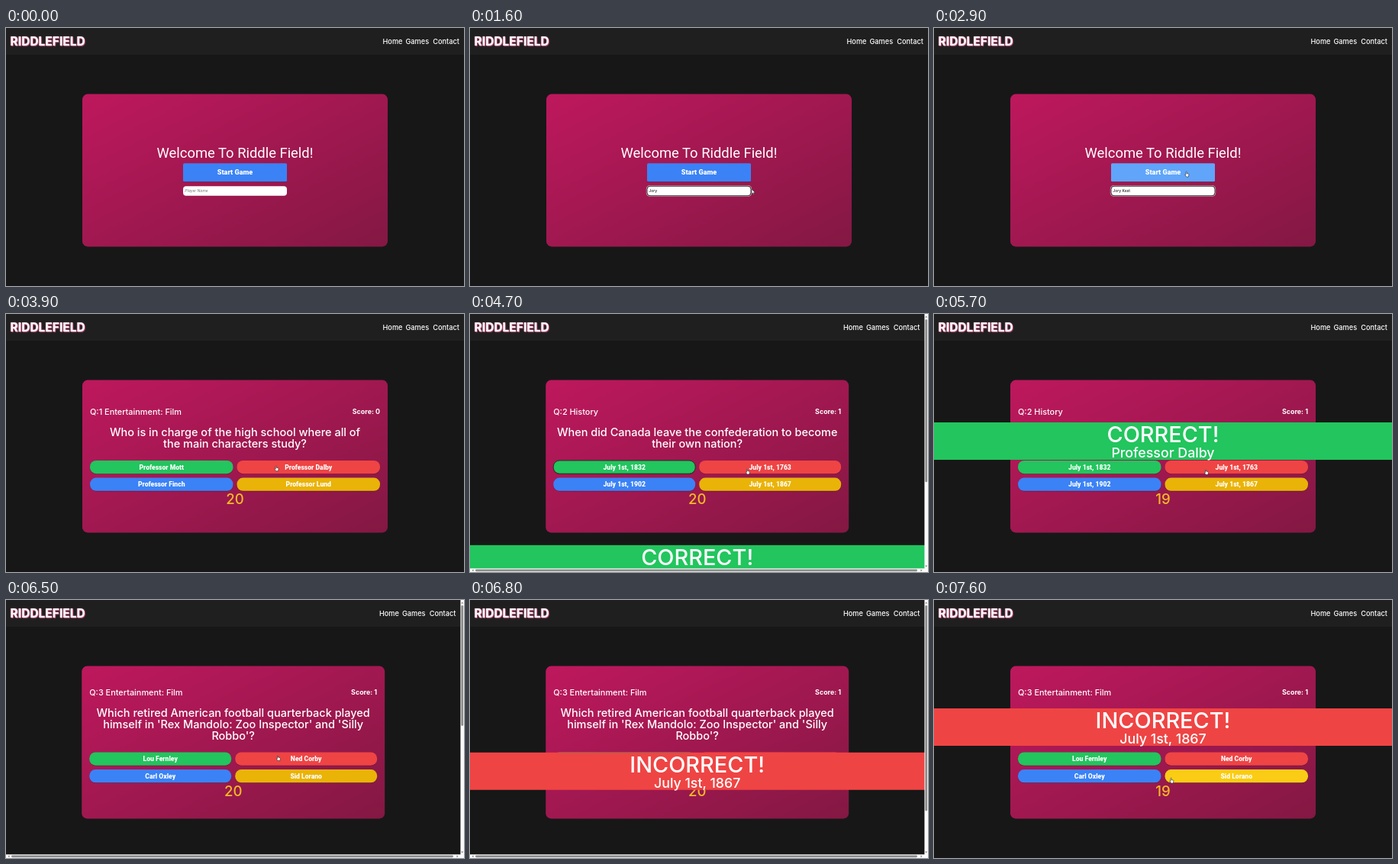
Recreate the animation shown at these times as an HTML page. Size 600 px wide and 338 px high, loop 8000 ms.

```html
<!DOCTYPE html>
<html lang="en">
<head>
<meta charset="utf-8">
<title>Quiz game</title>
<style>
  html, body { margin: 0; width: 100%; height: 100%; overflow: hidden; background: #171717; }
  svg { display: block; width: 100%; height: 100%; }
  text { font-family: Inter, sans-serif; font-weight: 500; fill: #fff; white-space: pre; }
  .heavy { font-family: Roboto, sans-serif; font-weight: 900; }
  .plain { font-family: Roboto, sans-serif; font-weight: 400; }
  .bold { font-weight: 700; }
  .logo { font-weight: 800; fill: #fff4f8; text-shadow: 0 0 1.5px #e0759f, .7px .7px 1px #b8456f; }
  .hint { font-weight: 400; font-style: italic; fill: #777; }
  .typed { fill: #222; }
  .timer { fill: #f4b925; }
</style>
</head>
<body>
<svg viewBox="0 0 600 338">
  <defs>
    <linearGradient id="pink" gradientUnits="userSpaceOnUse" x1="220" y1="27" x2="380" y2="347">
      <stop stop-color="#be185d"/><stop offset="1" stop-color="#831843"/>
    </linearGradient>
  </defs>
  <g id="stage"></g>
</svg>
<script>
const LOOP = 8000, STEP = 100, VIEW_H = 334;
const GREEN = '#22c55e', RED = '#ef4444', BLUE = '#3b82f6', YELLOW = '#eab308';
const PLAYER = 'Jory Kest';
const KEY_TIMES = [1200, 1400, 1400, 1600, 1700, 1800, 2000, 2100, 2200];

const ROUNDS = [
  { start: 3400, tick: 4200, score: 0, topic: 'Q:1 Entertainment: Film',
    lines: ['Who is in charge of the high school where all of', 'the main characters study?'],
    answers: ['Professor Mott', 'Professor Dalby', 'Professor Finch', 'Professor Lund'] },
  { start: 4500, tick: 5550, score: 1, topic: 'Q:2 History',
    lines: ['When did Canada leave the confederation to become', 'their own nation?'],
    answers: ['July 1st, 1832', 'July 1st, 1763', 'July 1st, 1902', 'July 1st, 1867'] },
  { start: 6500, tick: 7450, score: 1, topic: 'Q:3 Entertainment: Film',
    lines: ['Which retired American football quarterback played',
            "himself in 'Rex Mandolo: Zoo Inspector' and 'Silly", "Robbo'?"],
    answers: ['Lou Fernley', 'Ned Corby', 'Carl Oxley', 'Sid Lorano'] }
];

const BANNERS = [
  { start: 4564, leave: 6100, color: GREEN, title: 'CORRECT!', note: 'Professor Dalby' },
  { start: 6504, leave: LOOP, color: RED, title: 'INCORRECT!', note: 'July 1st, 1867' }
];

// time, x, y of the pointer tip
const POINTER = [
  [800, 369, 211], [2600, 369, 211], [2800, 330, 188], [3400, 330, 188], [4100, 362.5, 203],
  [5500, 362.5, 203], [5700, 355.5, 203.5], [7300, 355.5, 203.5], [7600, 310, 233]
];

const text = (s, x, y, size, cls = '', anchor = 'start') =>
  `<text x="${x}" y="${y}" font-size="${size}" class="${cls}" text-anchor="${anchor}">${s}</text>`;
const box = (x, y, w, h, fill, r = 0, extra = '') =>
  `<rect x="${x}" y="${y}" width="${w}" height="${h}" rx="${r}" fill="${fill}" ${extra}/>`;

function pointerAt(t) {
  const i = POINTER.findLastIndex(k => k[0] <= t);
  if (i < 0) return null;
  const a = POINTER[i], b = POINTER[i + 1] || a;
  const p = b === a ? 0 : (t - a[0]) / (b[0] - a[0]);
  return { x: a[1] + (b[1] - a[1]) * p, y: a[2] + (b[2] - a[2]) * p };
}

function pointer(t) {
  const at = pointerAt(t);
  if (!at) return '';
  const shape = t < 2700
    ? 'M0 0V6.4L1.5 5.1L2.5 7.2L3.4 6.8L2.5 4.8H4.5Z'
    : 'M0 .5Q.6 -.4 1.1 .5V2.6L3.6 3.2Q4 3.4 3.9 4.2L3.3 7H.6L-1.2 4.5Q-1 3.6 0 4.3Z';
  return `<path transform="translate(${at.x} ${at.y})" d="${shape}" fill="#fff" stroke="#222" stroke-width=".6"/>`;
}

function page(w) {
  return box(0, 0, 600, 338, '#171717') + box(0, 0, 600, 35, '#1f1f1f') +
    text('RIDDLEFIELD', 5.5, 23, 15.5, 'logo') +
    text('Home', w - 106.5, 20.5, 9.2) + text('Games', w - 76.5, 20.5, 9.2) +
    text('Contact', w - 40.7, 20.5, 9.2) +
    box(w / 6, 86.6, w * 2 / 3, 199.8, 'url(#pink)', 7);
}

function welcome(t) {
  const typed = PLAYER.slice(0, KEY_TIMES.filter(k => k <= t).length);
  const ring = t < 700 ? '' : 'stroke="#151515" stroke-width=".9"';
  return text('Welcome To Riddle Field!', 300, 169.5, 18.4, 'plain', 'middle') +
    box(232, 178, 136, 24.3, '#000', 1.5, 'opacity=".2"') +
    box(232, 177.3, 136, 24, t < 2800 ? BLUE : '#60a5fa', 1.5) +
    text('Start Game', 300, 192.3, 9.1, 'heavy', 'middle') +
    (ring && box(230.8, 206, 138.4, 15, '#fff', 5, 'opacity=".55"')) +
    box(232, 207.2, 136, 12.6, '#fff', 4, ring) +
    text(typed || 'Player Name', 234.3, 215.2, 5, typed ? 'typed' : 'hint');
}

function question(q, t, w, bars) {
  const left = w / 6 + 10, right = w * 5 / 6 - 10, mid = w / 2;
  const bw = (right - left - 5) / 2, dy = (q.lines.length - 2) * 7.5;
  const yellow = t >= 7500 ? '#facc15' : YELLOW;
  let out = text(q.topic, left, 132 - dy, 10.9) +
    text('Score: ' + q.score, right, 131 - dy, 8.9, 'bold', 'end');
  q.lines.forEach((s, i) => out += text(s, mid, 160 - dy + 15 * i, 14.5, '', 'middle'));
  [GREEN, RED, BLUE, yellow].forEach((fill, i) => {
    const x = left + (i % 2) * (bw + 5), y = 192 + dy + (i >> 1) * 22.6;
    const ring = i === 0 && bars && q === ROUNDS[1] ? 'stroke="#14261a" stroke-width=".8"' : '';
    out += box(x, y + .6, bw, 17.2, '#000', 8, 'opacity=".3"') + box(x, y, bw, 17.2, fill, 8, ring) +
      text(q.answers[i], x + bw / 2, y + 11.6, 8.6, 'heavy', 'middle');
  });
  return out + text(t < q.tick ? 20 : 19, mid, 249 + dy, 18.6, 'timer', 'middle');
}

// Rises to its place with a quintic ease-out, leaves downward
function bannerShift(b, t) {
  if (t >= b.leave) return VIEW_H * ((t - b.leave) / 175) ** 2;
  const p = Math.min(1, Math.max(0, (t - b.start) / 1000));
  return VIEW_H * (1 - p) ** 5;
}

function banner(b, shift, w) {
  const y = 142 + shift;
  return box(0, y, 600, 49, b.color) +
    text(b.title, w / 2, y + 25.8, 28.9, '', 'middle') + text(b.note, w / 2, y + 46, 17.8, '', 'middle');
}

function scrollbars(shift) {
  const thumb = 316 * VIEW_H / (VIEW_H + shift);
  const arrows = 'M596.3 4.5L597.7 2.5L599.1 4.5ZM596.3 329.5L597.7 331.5L599.1 329.5Z' +
    'M4.5 334.4L2.5 335.8L4.5 337.2ZM590.5 334.4L592.5 335.8L590.5 337.2Z';
  return box(595.4, 0, 4.6, 338, '#fafafa') + box(0, 333.3, 600, 4.7, '#fafafa') +
    box(596.3, 7, 2.8, thumb, '#8b8b8b', 1.4) + box(7, 334.4, 579, 2.8, '#8b8b8b', 1.4) +
    `<path d="${arrows}" fill="#777"/>`;
}

function scene(t) {
  const q = ROUNDS.findLast(r => r.start <= t);
  const b = q && BANNERS[ROUNDS.indexOf(q) - 1];
  const bars = b && t < b.start + 1000;
  const w = bars ? 595.4 : 600, shift = b ? bannerShift(b, t) : 0;
  return page(w) + (q ? question(q, t, w, bars) : welcome(t)) + pointer(t) +
    (b ? banner(b, shift, w) : '') + (bars ? scrollbars(shift) : '');
}

const stage = document.getElementById('stage'), began = performance.now();
let shown = -1;
function frame() {
  const t = Math.floor((performance.now() - began) % LOOP / STEP) * STEP;
  if (t !== shown) stage.innerHTML = scene(shown = t);
  requestAnimationFrame(frame);
}
frame();
</script>
</body>
</html>
```
